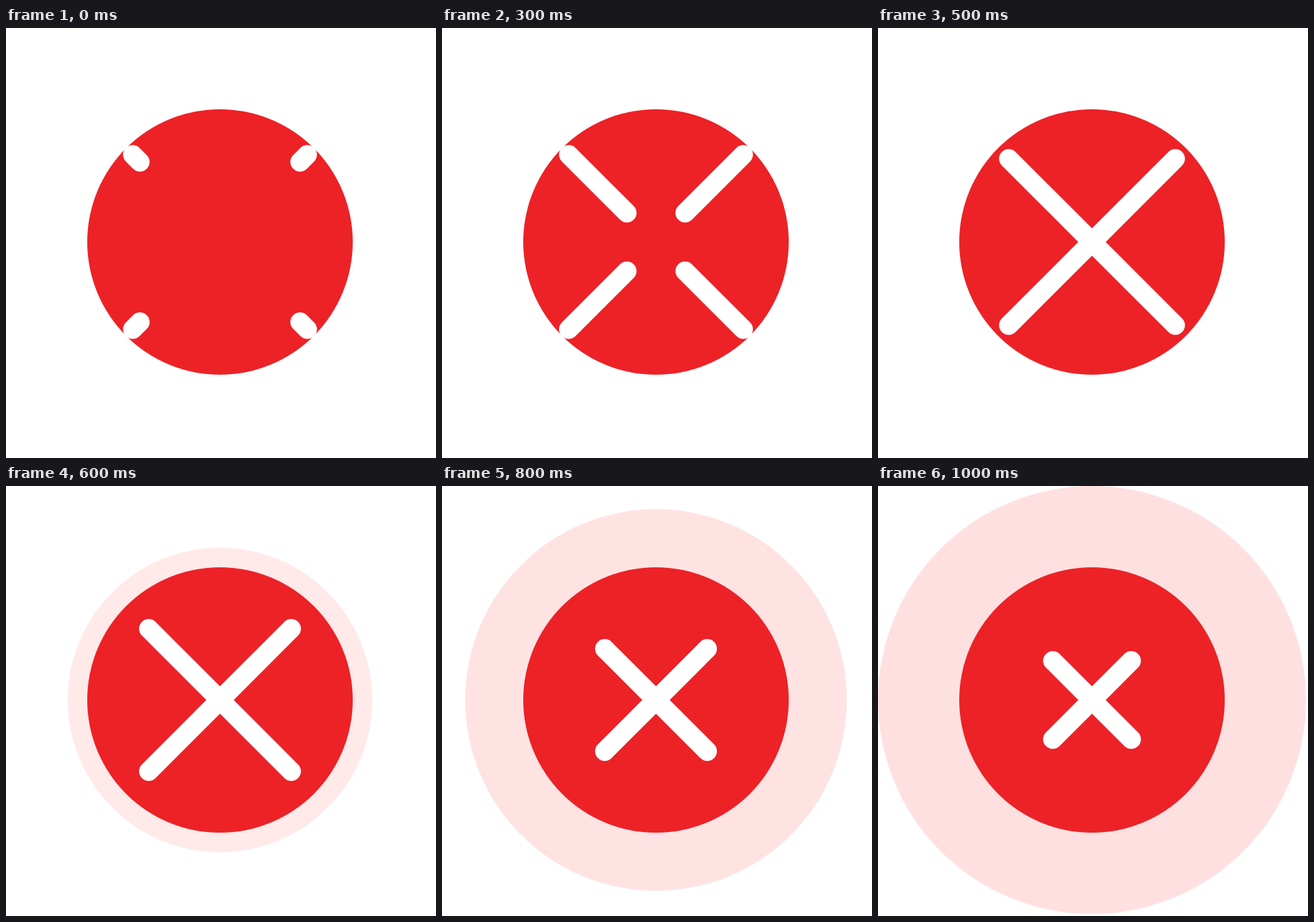
Recreate the animation shown at these times as an HTML page. Size 640 by 640 pixels, loop 1.6 s.

```html
<!DOCTYPE html>
<html lang="en">
<head>
<meta charset="utf-8">
<title>Error cross</title>
<style>
  html, body { margin: 0; height: 100%; overflow: hidden; background: #fff; }
  svg { display: block; width: 100vw; height: 100vh; }
</style>
</head>
<body>
<svg viewBox="0 0 640 640">
  <g transform="translate(318.5 318.5)">
    <circle id="halo"/>
    <circle r="197.6" fill="#ec2227"/>
    <path id="cross" fill="none" stroke="#fff" stroke-width="28.8" stroke-linecap="round"/>
  </g>
</svg>
<script>
const LOOP = 1600, HOLD = 100, TICK = 40;
const CORNERS = [[-1, -1], [1, -1], [1, 1], [-1, 1]];
const halo = document.getElementById('halo');
const cross = document.getElementById('cross');
const clamp = v => Math.max(0, Math.min(1, v));
const mix = (a, b, p) => a + (b - a) * p;

function draw(time) {
  // The pose advances in 40 ms ticks but is shown only every 100 ms.
  const shown = Math.floor(time % LOOP / HOLD) * HOLD;
  const tick = Math.floor(shown / TICK);
  const grow = clamp((tick + 1) / 12);     // arms reach the centre
  const settle = clamp((tick - 11) / 12);  // cross shrinks, halo spreads

  const inner = mix(130, 0, grow);
  const outer = mix(129.9, 58.4, settle);
  cross.setAttribute('d', CORNERS.map(([x, y]) =>
    `M${x * outer} ${y * outer}L${x * inner} ${y * inner}`).join(''));

  const tint = Math.round(mix(237, 224, settle));
  halo.setAttribute('r', settle ? mix(180.7, 318.5, settle) : 0);
  halo.setAttribute('fill', `rgb(255,${tint},${tint})`);
}

const start = performance.now();
function frame() {
  draw(performance.now() - start);
  requestAnimationFrame(frame);
}
frame();
</script>
</body>
</html>
```
